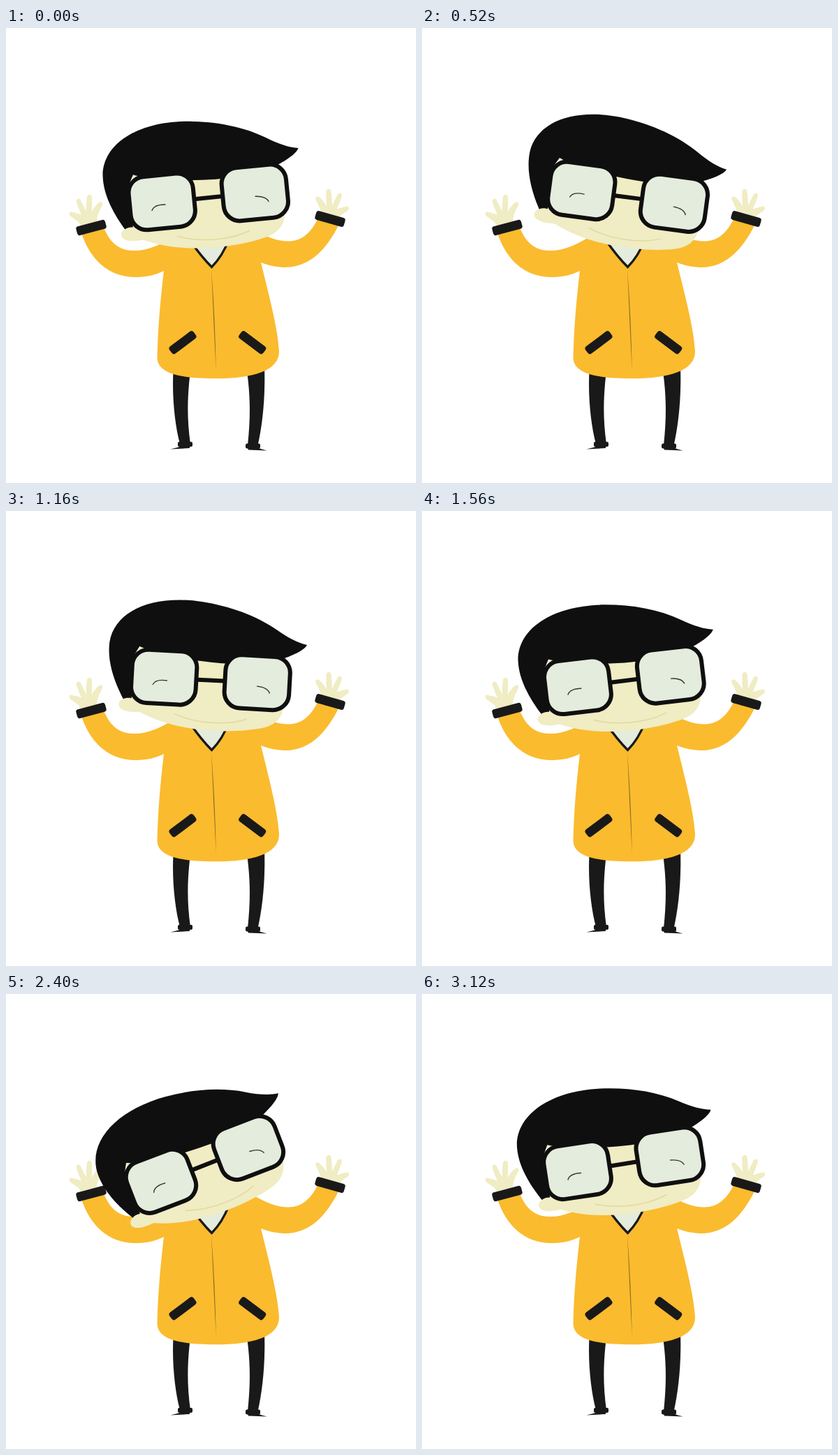
Animation of 587 by 652 pixels, one loop 3200 ms. Source, as an HTML page:

```html
<!DOCTYPE html>
<html lang="en">
<head>
<meta charset="utf-8">
<title>Swaying head</title>
<style>
  html, body { margin: 0; width: 100%; height: 100%; overflow: hidden; background: #fff; }
  svg { display: block; width: 587px; height: 652px; }
  .ink { fill: #1a1919; }
  .hair { fill: #0f0f0f; }
  .coat { fill: #fabb2e; }
  .skin { fill: #f0ecc3; }
  .glass { fill: #e4ecdd; }
  .line { fill: none; stroke-linecap: round; }
  .frame { stroke: #0f0f0f; stroke-width: 6; }
</style>
</head>
<body>
<svg viewBox="0 0 587 652">
  <defs>
    <path id="hand" class="skin" d="M109 286Q106 278 92.500 270Q88 265 93 263.500Q101 265 108 267.500
      Q103 257 100.500 248Q102 242 106.500 246Q111 255 114.500 262.500
      Q115 250 116 241.500Q119.500 235.500 123 241.500Q123.500 253 122.500 263.500
      Q127 255 133.500 250Q139 247.500 138 254Q133 263 131 270Q129.500 276 131 282Z"/>
    <rect id="lens" class="glass frame" x="-46.300" y="-38.200" width="92.600" height="76.400" rx="23"/>
    <rect id="pocket" class="ink" x="-21.500" y="-6.400" width="43" height="12.800" rx="4"/>
    <rect id="cuff" class="ink" x="-21.500" y="-6.600" width="43" height="13.200" rx="3.500"/>
  </defs>

  <!-- legs and shoes -->
  <g class="ink">
    <path d="M239.500 492C237.500 530 242 570 249 596L264 596C259 560 259.500 530 263.500 496Z"/>
    <path d="M345.500 496C350 530 350 560 346 598L360.500 598C367 570 371.500 530 370 486Z"/>
    <rect x="246" y="593" width="21" height="7" rx="2"/>
    <rect x="343" y="595.500" width="21" height="7" rx="2"/>
    <path d="M235.500 603.500Q246 601 252 599L263 599V602Z"/>
    <path d="M346 602L360 601Q365 603.500 374 605.500L347 604.500Z"/>
  </g>

  <use href="#hand"/>
  <use href="#hand" transform="translate(581.500 -8) scale(-1 1)"/>

  <!-- coat -->
  <path class="coat" d="M108 294C120 330 145 357 186 357C203 357 216 353 226 348
    C221 390 217.500 430 216.500 472C216.500 496 252 502.300 300 502.300
    C352 502.300 391.500 492 391 463C389 430 377 385 365 336
    C378 341 390 343 400 343C438 342.500 461 313 476.500 282L446 274
    C435 297 420 306 403 305.500C385 305 370 298 350 286L245 296
    C221 311 203 319.500 182 319C165 318.500 150 311 140 286Z"/>
  <use href="#cuff" transform="translate(122 286) rotate(-15)"/>
  <use href="#cuff" transform="translate(464 273.500) rotate(16)"/>
  <use href="#pocket" transform="translate(253 450.700) rotate(-37)"/>
  <use href="#pocket" transform="translate(352.700 450.700) rotate(37)"/>
  <path fill="#8a6a22" d="M294 345Q299.500 418 300.700 491Q297 418 294 345Z"/>
  <path class="glass" stroke="#1a1919" stroke-width="3.300" d="M264 305Q279 327 294.500 342.500Q310 327 319 303"/>

  <g id="head">
    <path class="skin" d="M182 206L176 290L195 303C222 313 250 316 280 315.500
      C315 314.500 350 308 373 299.500C388 294 398 284 399 268L392 196Z"/>
    <path class="hair" d="M418.500 172C406 171.500 390 166 374 158C340 141 300 134 262 133.700
      C190 133.500 139 165 138.500 211C139 240 155 268 172 291L182 288L177 222L182 210.300
      C200 216.500 250 218.500 270 218C330 217 360 208 389 196C401 189.500 416 180 418.500 172Z"/>
    <path class="skin" d="M194 290C184 284 176 285 171 288C163 292 163 301 172 304C182 307 192 304 202 303Z"/>
    <path class="line" stroke="#e2d89f" stroke-width="1.500" d="M246 298.500C275 307 320 305 348.500 290.500"/>
    <path class="line frame" d="M272 245L308 241.200"/>
    <use href="#lens" transform="translate(223.200 248.900) rotate(-5.600)"/>
    <use href="#lens" transform="translate(356.300 236) rotate(-5.600)"/>
    <g class="line" stroke="#343832" stroke-width="1.400">
      <path d="M209 261.500C211 255.500 219 253 228 253"/>
      <path d="M357 241.300C366 241 373.500 243.500 376 248.500"/>
    </g>
  </g>
</svg>
<script>
  const LOOP = 3200, STEP = 40, LAST = 3120;
  const REST = -5.6; // tilt at which the head is drawn
  const PIVOT = "294.5 263.2";
  // time in ms, tilt in degrees
  const sway = [
    [0, -5.6], [520, 7.6], [800, 12.8], [1120, 4.2], [1560, -6.7], [1680, -9.3],
    [2080, -16.4], [2240, -19.7], [2400, -21], [2800, -14], [3120, -8.6]
  ];
  const head = document.getElementById("head");

  function slope(i) {
    const a = sway[Math.max(i - 1, 0)], b = sway[Math.min(i + 1, sway.length - 1)];
    return (b[1] - a[1]) / (b[0] - a[0]);
  }

  // cubic Hermite curve through the sway points
  function tilt(t) {
    let i = 0;
    while (i < sway.length - 2 && t >= sway[i + 1][0]) i++;
    const [t0, a] = sway[i], [t1, b] = sway[i + 1];
    const d = t1 - t0, u = (t - t0) / d, v = 1 - u;
    return a * v * v * (1 + 2 * u) + b * u * u * (3 - 2 * u)
      + d * u * v * (slope(i) * v - slope(i + 1) * u);
  }

  function draw(now) {
    const t = Math.min(Math.floor((now % LOOP) / STEP) * STEP, LAST);
    head.setAttribute("transform", `rotate(${(tilt(t) - REST).toFixed(3)} ${PIVOT})`);
  }

  const start = performance.now();
  function tick() {
    draw(performance.now() - start);
    requestAnimationFrame(tick);
  }
  tick();
</script>
</body>
</html>
```
